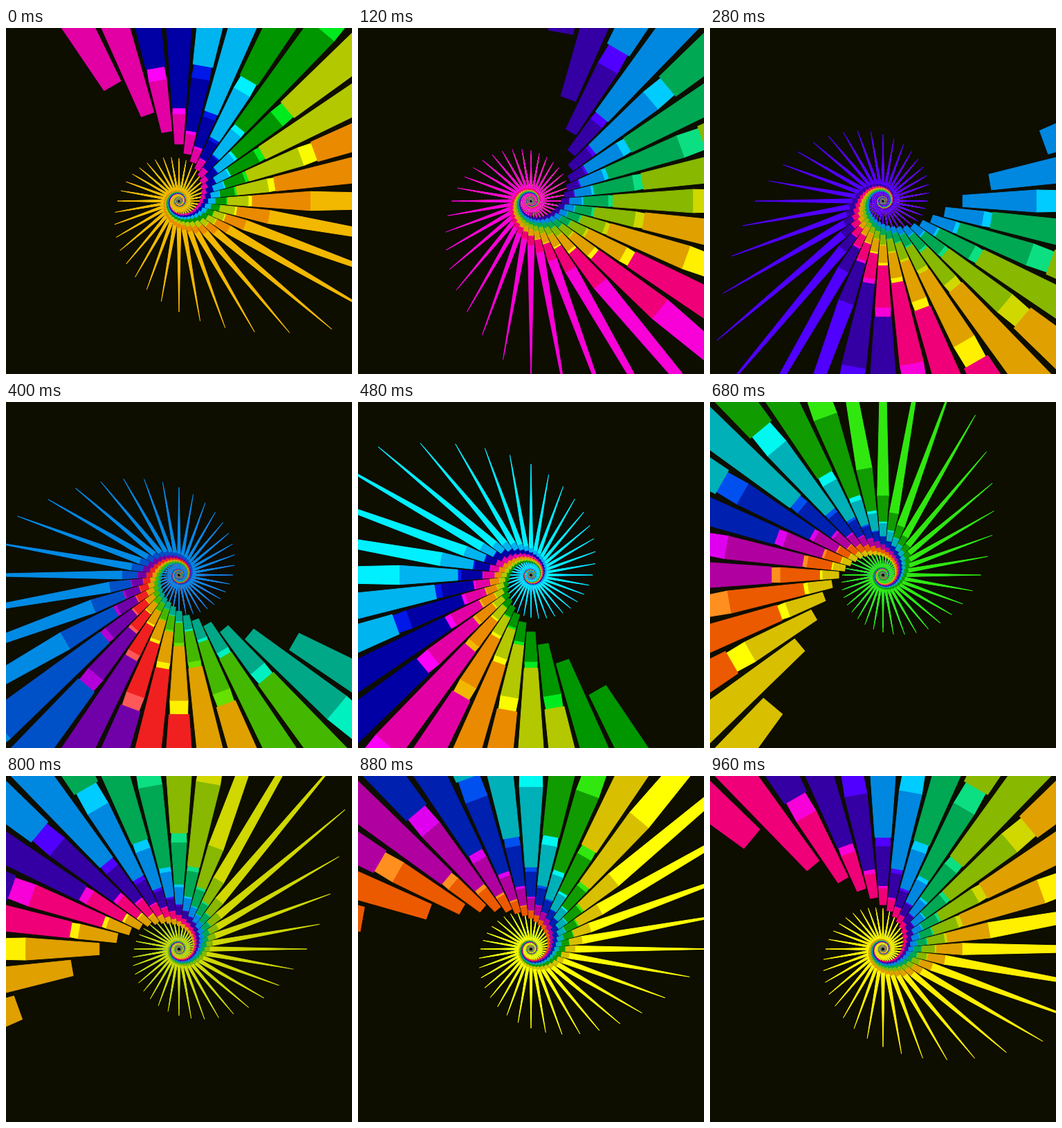
An HTML page with a canvas for the animation above (1040 ms loop, 500 px wide and 500 px high).

```html
<!DOCTYPE html>
<html lang="en">
<head>
<meta charset="utf-8">
<title>Rainbow spike spiral</title>
<style>
  html, body { margin: 0; width: 100%; height: 100%; overflow: hidden; background: #0d0d00; }
  canvas { display: block; width: 500px; height: 500px; }
</style>
</head>
<body>
<canvas id="stage" width="500" height="500"></canvas>
<script>
const ctx = document.getElementById('stage').getContext('2d');

// Colour wheel in 15 degree steps: plank body and its brighter spike.
const BODY = ('#ec5a00 #ea8a00 #e0a000 #e0a000 #d8c000 #b4c800 #88b800 #44b800 ' +
  '#109c00 #009600 #00a854 #00a888 #00b0b8 #00b4f0 #0088e0 #0050c8 ' +
  '#0020b0 #0000a4 #3400a4 #7000a8 #b000a0 #e200a4 #f00078 #f02020').split(' ');
const SPIKE = ('#ff9020 #f2b800 #fff000 #fff000 #ffff00 #fafa00 #d0d800 #66e000 ' +
  '#30e810 #00eb1e #0cdf82 #00f0c0 #00f8f0 #00f0ff #00ccff #008ae4 ' +
  '#0050f0 #0018e8 #5000ff #b400d8 #e000f0 #ff00f8 #f800d8 #ff5858').split(' ');

const LOOP = 1040, TICK = 40;
const BANDS = 6, TURNS = 5;
const SLOPE = 0.000232;   // depth gained per degree along the helix
const PITCH = 0.00472;    // depth of one band
const GAP = 0.00056;      // visible start of a spike before the next plank
const TIP = 0.2385;       // depth of a spike's tip relative to its base
const HALF = 0.0722;      // half width per unit of radius
const NEAR = 0.0008;

function shape(color, points) {
  ctx.fillStyle = ctx.strokeStyle = color;
  ctx.beginPath();
  for (const [x, y] of points) ctx.lineTo(x, y);
  ctx.closePath();
  ctx.fill();
  ctx.stroke();
}

// Screen radius is the inverse of depth.
function plank(start, hue) {
  if (start <= NEAR) return;
  const end = start - PITCH + GAP;
  const r0 = 1 / start, r1 = 1 / Math.max(end, NEAR);
  if (end > NEAR) {
    shape(SPIKE[hue], [[r1, -r1 * HALF], [r1 / TIP, 0], [r1, r1 * HALF]]);
  }
  shape(BODY[hue], [[r0, -r0 * HALF], [r1, -r1 * HALF], [r1, r1 * HALF], [r0, r0 * HALF]]);
}

function draw(pose) {
  ctx.setTransform(1, 0, 0, 1, 0, 0);
  ctx.fillStyle = '#0d0d00';
  ctx.fillRect(0, 0, 500, 500);
  ctx.lineWidth = 1;
  ctx.lineJoin = 'round';
  // From the far end of the helix to the near one.
  for (let i = TURNS * 36; i >= -36; i--) {
    const a = i * Math.PI / 18, c = Math.cos(a), s = Math.sin(a);
    ctx.setTransform(c, s, -s, c, 250, 250);
    const front = 0.0052 + SLOPE * (i * 10 - pose * 15 + 120);
    for (let j = 0; j < BANDS; j++) {
      plank(front - PITCH * j, (69 - pose - 4 * j) % 24);
    }
  }
}

// One pose per tick, with a short hold late in the loop and at its end.
function poseAt(ms) {
  const tick = Math.floor((ms % LOOP) / TICK);
  return Math.min(23, tick > 17 ? tick - 1 : tick);
}

let shown = -1, begin = null;
function step(now) {
  if (begin === null) begin = now;
  const pose = poseAt(Math.max(0, now - begin));
  if (pose !== shown) draw(shown = pose);
  requestAnimationFrame(step);
}
draw(shown = 0);
requestAnimationFrame(step);
</script>
</body>
</html>
```
